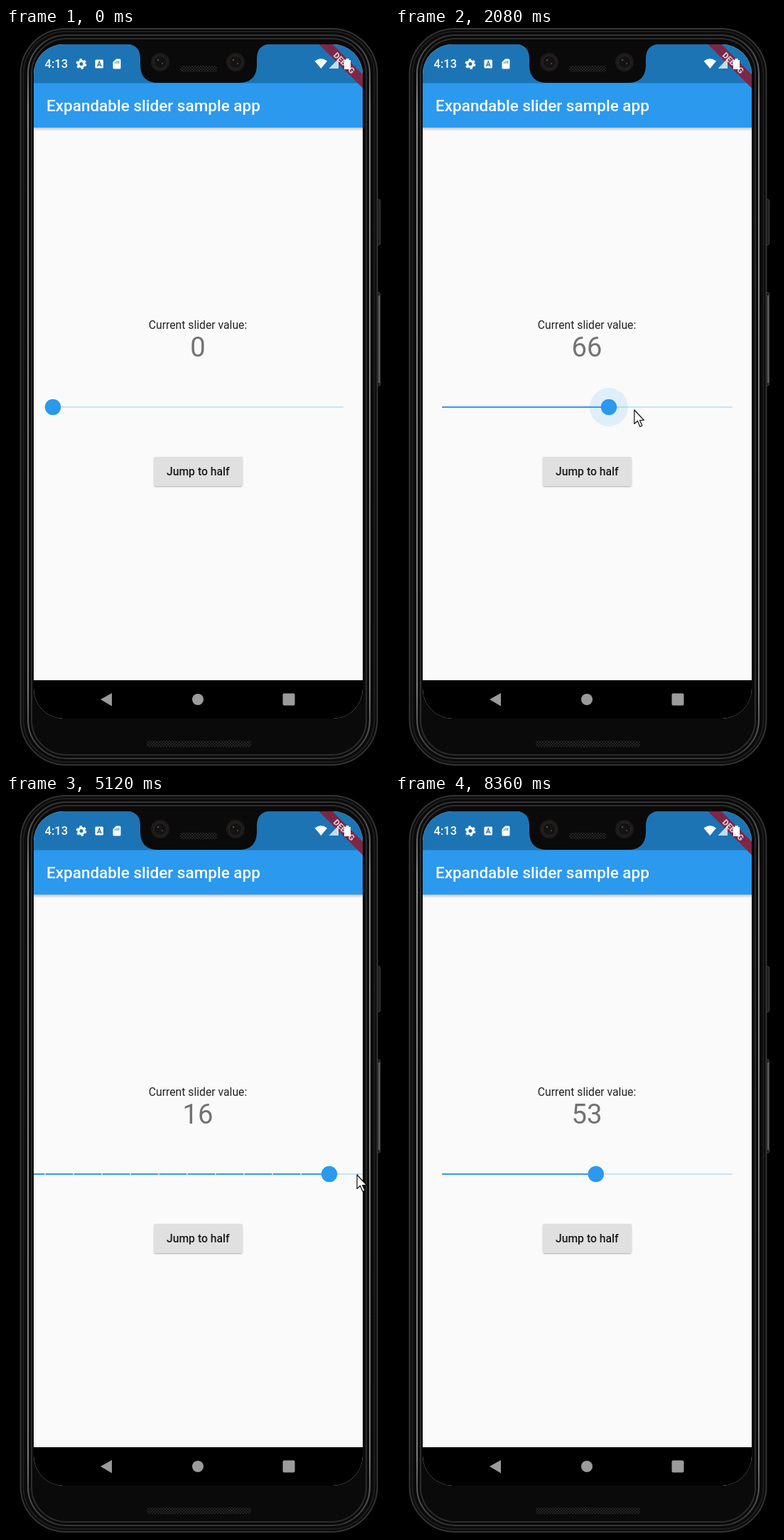
Animation, 539 px wide and 1039 px high, one loop 8520 ms. Source, as an HTML page:

```html
<!DOCTYPE html>
<html lang="en">
<head>
<meta charset="utf-8">
<title>Expandable slider</title>
<style>
  html, body { margin: 0; width: 100%; height: 100%; overflow: hidden; background: #000; }
  svg { display: block; width: 539px; height: 1039px; font-family: Roboto, sans-serif; }
  .medium { font-weight: 500; }
  .mid { text-anchor: middle; }
</style>
</head>
<body>
<svg viewBox="0 0 539 1039">
  <defs>
    <clipPath id="screen"><rect x="39" y="23" width="463" height="948" rx="42"/></clipPath>
    <clipPath id="buttonClip"><rect x="208" y="603" width="125" height="41" rx="2"/></clipPath>
    <linearGradient id="barShadow" x2="0" y2="1">
      <stop stop-color="#000" stop-opacity=".22"/>
      <stop offset="1" stop-color="#000" stop-opacity="0"/>
    </linearGradient>
    <linearGradient id="rim" x2="0" y2="1">
      <stop stop-color="#333"/><stop offset=".1" stop-color="#8c8c8c"/>
      <stop offset=".9" stop-color="#7c7c7c"/><stop offset="1" stop-color="#333"/>
    </linearGradient>
    <pattern id="mesh" width="4" height="4" patternUnits="userSpaceOnUse">
      <rect width="4" height="4" fill="#0b0b0b"/>
      <path d="M0 0l4 4M4 0l-4 4" stroke="#2c2c2c" stroke-width=".8"/>
    </pattern>
    <g id="camera">
      <circle r="13" fill="#1d1b1a"/>
      <circle r="9" fill="#141212" stroke="#2b2928"/>
      <circle cx="-3" cy="-3" r="1.3" fill="#5a4a42"/>
      <circle cx="3" cy="2" r="1.2" fill="#4a403c"/>
    </g>
    <filter id="blur" x="-20%" y="-40%" width="140%" height="190%"><feGaussianBlur stdDeviation="1.2"/></filter>
    <filter id="softBlur" x="-20%" y="-40%" width="140%" height="190%"><feGaussianBlur stdDeviation="3.5"/></filter>
  </defs>

  <!-- phone body -->
  <rect width="539" height="1039"/>
  <g fill="#1c1c1c" stroke="#444">
    <rect x="519" y="241" width="7.5" height="64" rx="2"/>
    <rect x="519" y="372" width="7.5" height="131" rx="2"/>
  </g>
  <path d="M525 376V499" stroke="#999"/>
  <g fill="#0a0a0a" stroke-width="2">
    <rect x="20.5" y="1" width="502" height="1035" rx="64" stroke="#333"/>
    <rect x="24.5" y="5" width="494" height="1027" rx="60" stroke="#1e1e1e"/>
    <rect x="31" y="10" width="481" height="1017" rx="54" stroke="url(#rim)"/>
    <rect x="36" y="15" width="471" height="1007" rx="49" stroke="#2c2c2c"/>
  </g>
  <rect x="198" y="1002" width="147" height="9" rx="3" fill="url(#mesh)"/>

  <g clip-path="url(#screen)">
    <rect x="39" y="23" width="463" height="948" fill="#fafafa"/>
    <rect x="39" y="140" width="463" height="5" fill="url(#barShadow)"/>
    <rect x="39" y="77" width="463" height="63" fill="#2b99ee"/>
    <rect x="39" y="23" width="463" height="54.5" fill="#1d74b4"/>
    <text x="57" y="117" font-size="22.5" class="medium" fill="#fff">Expandable slider sample app</text>

    <text x="270" y="422.5" font-size="15.74" class="mid" fill="#222">Current slider value:</text>
    <text id="label" x="270" y="462" font-size="38.2" class="mid" fill="#737373">0</text>

    <g transform="translate(0 533)">
      <line id="inactive" stroke="#c7e3f9" stroke-width="2" stroke-linecap="round"/>
      <line id="active" stroke="#3a97e6" stroke-width="2.2" stroke-linecap="round"/>
      <g stroke-width="2.2" stroke-linecap="round">
        <path id="ticksOff" stroke="#7fb9e6"/>
        <path id="ticksOn" stroke="#c3e0f8"/>
      </g>
      <circle id="halo" fill="#2b99ee" fill-opacity=".13"/>
      <circle id="thumb" r="11.2" fill="#2b99ee"/>
    </g>

    <rect id="lift" x="208" y="606" width="125" height="41" rx="2" opacity="0" filter="url(#softBlur)"/>
    <rect x="208.5" y="604" width="124" height="41" rx="2" opacity=".32" filter="url(#blur)"/>
    <rect x="208" y="603" width="125" height="41" rx="2" fill="#e0e0e0"/>
    <circle id="ripple" cx="269" cy="616" clip-path="url(#buttonClip)" opacity="0"/>
    <text x="270.3" y="629" font-size="15.74" class="medium mid" fill="#1b1b1b">Jump to half</text>

    <rect x="39" y="917" width="463" height="54"/>
    <g fill="#9b9b9b">
      <path d="M133 944L149 935V953.5Z"/>
      <circle cx="270" cy="944" r="8"/>
      <rect x="389.5" y="935.5" width="17" height="17" rx="2"/>
    </g>

    <!-- debug ribbon -->
    <g transform="translate(502 23) rotate(45)">
      <rect x="-48" y="30" width="96" height="13.5" fill="#7d2747"/>
      <text y="41" font-size="11.5" font-weight="900" class="mid" fill="#d8c8cc">DEBUG</text>
    </g>

    <!-- status bar -->
    <g fill="#fff">
      <text x="54.5" y="56" font-size="16.5" class="medium">4:13</text>
      <g fill="none" stroke="#fff">
        <circle cx="106" cy="50.5" r="4.1" stroke-width="3.2"/>
        <circle cx="106" cy="50.5" r="6.3" stroke-width="2.2" stroke-dasharray="3.3"/>
      </g>
      <rect x="125.5" y="44.5" width="11.5" height="12" rx="1.5"/>
      <path d="M128.500 54L131.300 47L134 54M129.500 52H133" fill="none" stroke="#1d74b4" stroke-width="1.3"/>
      <path d="M155 43.500H160Q161.500 43.500 161.500 45V56Q161.500 57.500 160 57.500H152Q150.500 57.500 150.500 56V48Z"/>
      <path d="M153.700 47.500V50M156.200 46V50M158.700 46V50" stroke="#1d74b4"/>
      <path d="M434.500 46.500Q443.300 39.500 452 46.500L443.300 57Z"/>
      <path d="M468 43V57H454.500Z" fill-opacity=".75"/>
      <path d="M476 45H478.500V43H482.500V45H485V58H476Z"/>
    </g>
  </g>

  <!-- notch -->
  <path d="M168 22Q189 23 189 43V53Q190 77 214 77H328Q352 77 353 53V43Q353 23 374 22Z" fill="#0a0a0a"/>
  <use href="#camera" x="217" y="48"/>
  <use href="#camera" x="323" y="48"/>
  <rect x="245" y="53" width="52" height="9" rx="4" fill="url(#mesh)"/>

  <path id="cursor" d="M0 0V19.500L4.500 15.500L8 23.500L11 22L7.600 14.500H13.500Z" fill="#fff" stroke="#111" stroke-width="1.2" stroke-linejoin="round"/>
</svg>

<script>
const LOOP = 8520, STEP = 40, MAX = 100, LAG = 30, HOTSPOT = .8;
const GRAB = 700, RELEASE = 2640, EXPAND = 2960, REGRAB = 3680, DROP = 5200;
const PRESS = 5960, JUMP = 6120, TAP = 7240, LEAVE = 8360;

// The pointer eases from stop to stop.
const stops = [
  { time: 40, x: 17, y: 587 }, { time: GRAB, x: 66, y: 532 },
  { time: 2100, x: 337, y: 537 }, { time: 2610, x: 94, y: 530 },
  { time: REGRAB, x: 94, y: 530 }, { time: 4320, x: 494, y: 534 },
  { time: DROP, x: 494, y: 534 }, { time: 5760, x: 269, y: 616 },
  { time: 6720, x: 269, y: 616 }, { time: 7160, x: 400, y: 532 },
  { time: 8240, x: 400, y: 532 }, { time: LEAVE, x: 480, y: 512 }
];

const mix = (a, b, p) => a + (b - a) * p;
const ramp = (time, from, to) => Math.min(1, Math.max(0, (time - from) / (to - from)));
function ease(time, from, to) {
  const p = ramp(time, from, to);
  return p * p * (3 - 2 * p);
}

function pointerAt(time) {
  const next = Math.max(1, stops.findIndex(stop => stop.time >= time));
  const from = stops[next - 1], to = stops[next];
  const p = ease(time, from.time, to.time);
  return { x: mix(from.x, to.x, p), y: mix(from.y, to.y, p) };
}

// Left end and width of the whole slider track.
function viewAt(time) {
  const open = ease(time, EXPAND, EXPAND + 640) - ease(time, TAP + 40, TAP + 660);
  const left = mix(-185, -1730, ease(time, JUMP, JUMP + 380));
  return { left: mix(66, left, open), width: mix(409, 4000, open) };
}

function valueAt(time) {
  if (time < GRAB) return 0;
  if (time >= JUMP && time < TAP) return MAX / 2;
  const held = time >= TAP ? TAP : Math.min(time, time < REGRAB ? RELEASE : DROP);
  const { left, width } = viewAt(held);
  return Math.floor((pointerAt(held).x + HOTSPOT - left) / width * MAX);
}

// The thumb glides: it shows the mean of the recent values.
function thumbAt(time) {
  const span = time < EXPAND ? 480 : 70, samples = 40;
  let sum = 0;
  for (let i = 0; i < samples; i++) sum += valueAt(time - LAG - span * (i + .5) / samples);
  return sum / samples;
}

const part = id => document.getElementById(id);
function set(id, attributes) {
  for (const name in attributes) part(id).setAttribute(name, attributes[name]);
}

function drawTicks(left, width, thumbX) {
  const gap = width / MAX;
  let on = "", off = "";
  for (let i = 0; gap >= 6.5 && i <= MAX; i++) {
    const x = left + i * gap, dot = `M${x} 0h.01`;
    if (x < thumbX) on += dot; else off += dot;
  }
  set("ticksOn", { d: on });
  set("ticksOff", { d: off });
}

function draw(time) {
  const { left, width } = viewAt(time);
  const thumbX = left + width * thumbAt(time) / MAX;
  set("inactive", { x1: left + 1, x2: left + width - 1 });
  set("active", { x1: Math.min(left + 1, thumbX), x2: thumbX });
  drawTicks(left, width, thumbX);
  set("thumb", { cx: thumbX });
  set("halo", { cx: thumbX, r: 27 * (ramp(time, GRAB, GRAB + 100) - ramp(time, RELEASE - 180, RELEASE - 80)) });
  part("label").textContent = valueAt(time - LAG);

  set("ripple", {
    r: 90 * ramp(time, PRESS, PRESS + 280),
    opacity: .12 * (1 - ramp(time, PRESS + 240, PRESS + 460))
  });
  set("lift", { opacity: .3 * (ramp(time, PRESS, PRESS + 120) - ramp(time, PRESS + 260, PRESS + 480)) });

  const visible = time >= stops[0].time && time < LEAVE;
  const { x, y } = pointerAt(Math.min(time, LEAVE));
  set("cursor", { transform: `translate(${x} ${y})`, visibility: visible ? "visible" : "hidden" });
}

const start = performance.now();
function frame() {
  const elapsed = (performance.now() - start) % LOOP;
  draw(Math.floor(elapsed / STEP) * STEP);
  requestAnimationFrame(frame);
}
frame();
</script>
</body>
</html>
```
